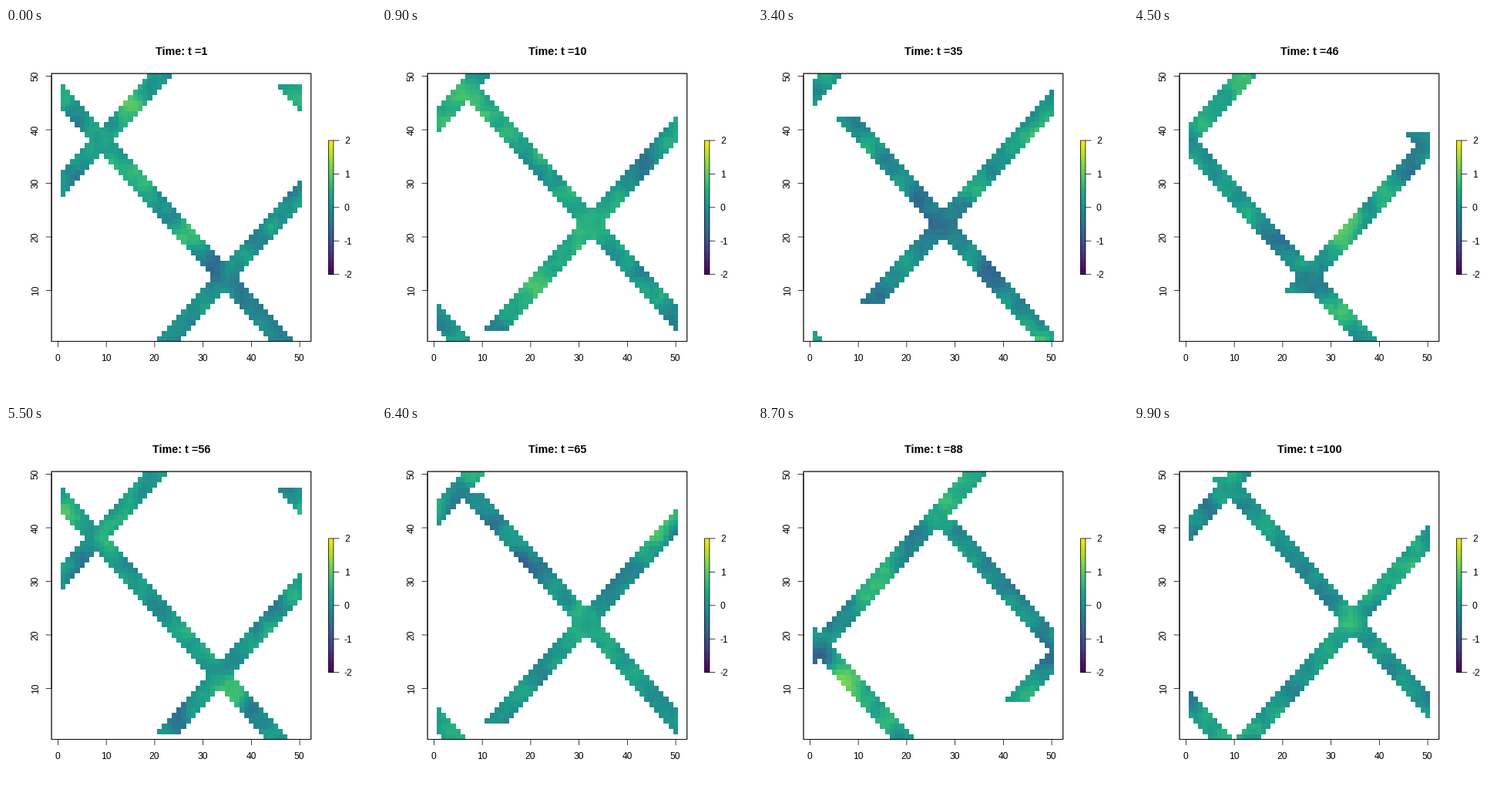
A matplotlib script for the animation above (10000 ms loop, 480 px wide and 480 px high).

```python
import numpy as np
import matplotlib.pyplot as plt
from matplotlib.animation import FuncAnimation
from matplotlib.patches import Rectangle

N, STEPS = 50, 100
PX = 0.75                      # points per pixel at 96 dpi
LINE = 14.4                    # height of one margin line
L, R, T, B = 59.04, 395.76, 59.04, 406.56
BAR_L, BAR_R = 418.44, 424.92
BAR_T, BAR_B = T + (B - T) / 4, B - (B - T) / 4
MID = (N + 1) / 2
CELL_Y = (B - T) / N
CELL_X = CELL_Y * np.cos(np.radians(MID))   # aspect of a lon/lat map
MEAN, SD, AR, SCALE = 0.1, 0.32, 0.7, 2.0


def x_px(v):
    return (L + R) / 2 + CELL_X * (v - MID)


def y_px(v):
    return B - CELL_Y * (v - 0.5)


def bar_px(v):
    return BAR_B - (v + 2) / 4 * (BAR_B - BAR_T)


def simulate():
    """Smooth Matern 3/2 random field, AR(1) in time."""
    rng = np.random.default_rng(12)
    wrap = np.minimum(np.arange(N), N - np.arange(N))
    d = np.hypot(wrap[:, None], wrap) / SCALE
    gain = SD * np.sqrt(np.abs(np.fft.fft2((1 + d) * np.exp(-d))))

    def shock():
        return np.fft.ifft2(gain * np.fft.fft2(rng.standard_normal((N, N)))).real

    fields = [shock()]
    for _ in range(STEPS - 1):
        fields.append(AR * fields[-1] + np.sqrt(1 - AR**2) * shock())
    return MEAN + np.array(fields)


def swath(t):
    """Cells seen at time t: two diagonal tracks over the flat cell index."""
    s = 10 * (t % 50)
    centres = np.r_[np.arange(12 + s, N * N + 2, N + 1),
                    np.arange(2407 - s, -3, 1 - N)]
    cells = (centres[:, None] + np.arange(-2, 3)).ravel()
    seen = np.zeros(N * N, bool)
    seen[cells[(cells >= 0) & (cells < N * N)]] = True
    return seen.reshape(N, N)


fig = plt.figure(figsize=(5, 5), dpi=96, facecolor="white")
ax = fig.add_axes([0, 0, 1, 1])
ax.axis("off")


def line(xs, ys):
    ax.plot(xs, ys, color="black", lw=0.75 * PX, snap=False,
            solid_capstyle="round")


def label(x, y, s, size=12, **kw):
    kw = {"ha": "center", "va": "baseline", **kw}
    return ax.text(x, y, s, fontsize=size * PX, family="Liberation Sans", **kw)


def border(x0, x1, y0, y1):
    ax.add_patch(Rectangle((x0, y0), x1 - x0, y1 - y0, fill=False,
                           ec="black", lw=0.75 * PX, snap=False, zorder=3))


def cells(xs, ys, values):
    """Hard-edged cells on whole pixels."""
    return ax.pcolormesh(np.round(xs), np.round(ys), values, cmap="viridis",
                         vmin=-2, vmax=2, antialiased=False)


field = simulate()
edges = np.arange(N + 1) + 0.5
mesh = cells(x_px(edges), y_px(edges), field[0])
shades = np.linspace(-2, 2, 175)
cells(np.array([BAR_L, BAR_R]), bar_px(shades), shades[:-1, None])

for _ in range(2):             # doubled stroke darkens the main border
    border(L, R, T, B)
border(BAR_L, BAR_R, BAR_T, BAR_B)

line([x_px(0), x_px(50)], [B, B])
line([L, L], [y_px(10), y_px(50)])
for v in range(0, 51, 10):
    line([x_px(v)] * 2, [B, B + LINE / 2])
    label(x_px(v) - 0.4, 432, str(v))
    if v:
        line([L, L - LINE / 2], [y_px(v)] * 2)
        label(L - LINE, y_px(v), str(v), rotation=90, ha="right", va="center")
for v in range(-2, 3):
    line([BAR_R, BAR_R + LINE / 2], [bar_px(v)] * 2)
    label(BAR_R + LINE - 0.4, bar_px(v) + 4.3, str(v), ha="left")

title = label((L + R) / 2, 35, "", size=14.4, weight="bold")
ax.set_xlim(0, 480)
ax.set_ylim(480, 0)


def update(i):
    t = i + 1
    mesh.set_array(np.ma.masked_array(field[i], ~swath(t)))
    title.set_text(f"Time: t ={t}")
    return mesh, title


anim = FuncAnimation(fig, update, frames=STEPS, interval=100,
                     repeat=True, repeat_delay=0)
plt.show()
```
